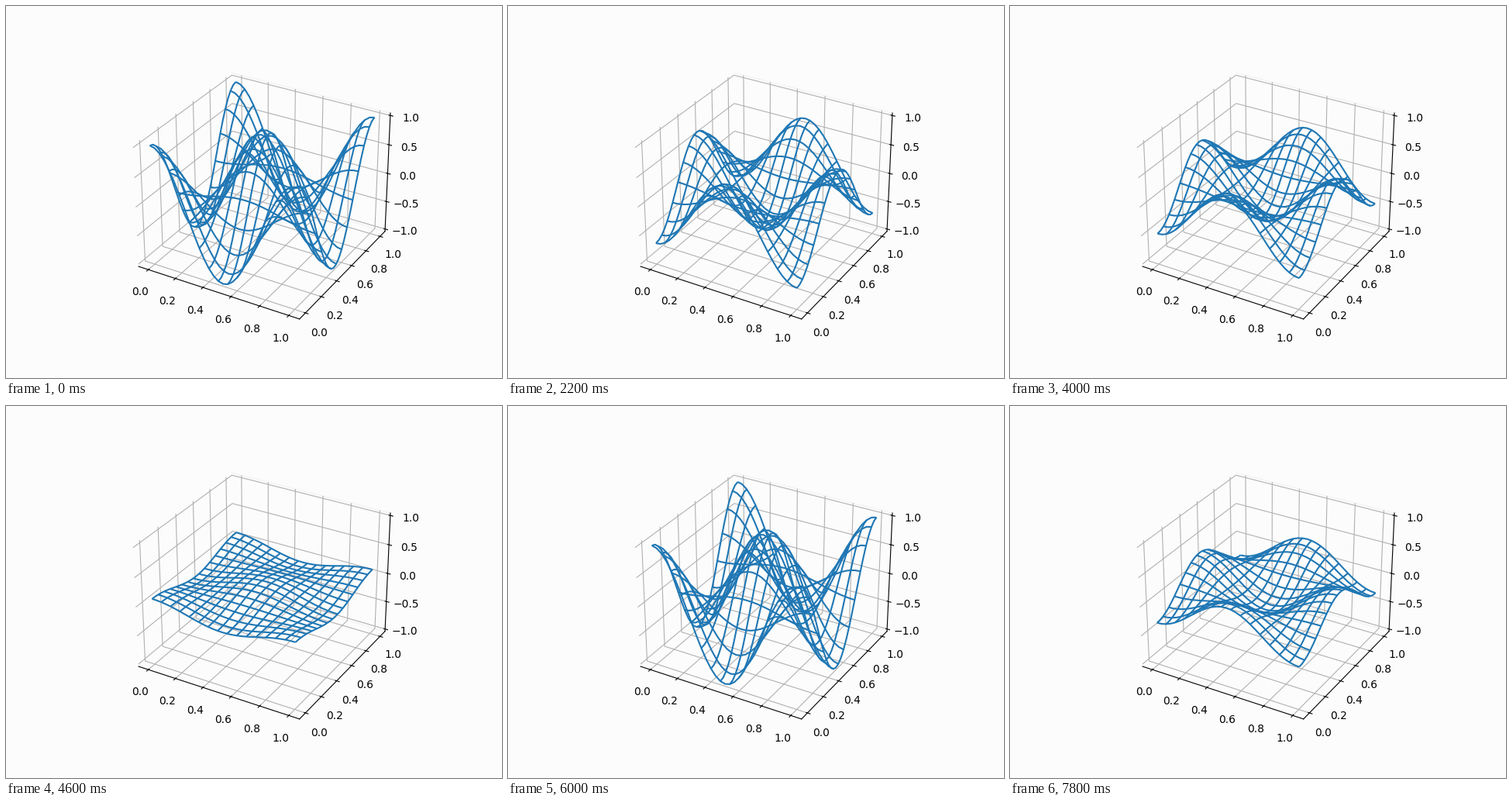
Write a matplotlib script that moves like this. It is 640x480 px and loops after 8 s.

```python
import numpy as np
import matplotlib.pyplot as plt
from matplotlib.animation import FuncAnimation

FRAMES = 40
PERIOD = 30          # frames per oscillation
MARGIN = 1 / 48

x, y = np.meshgrid(np.linspace(0, 1, 31), np.linspace(0, 1, 31), indexing="ij")
mode = np.cos(2 * np.pi * x) * np.cos(2 * np.pi * y)

fig = plt.figure(figsize=(6.4, 4.8), dpi=100, facecolor="#fcfcfc")
ax = fig.add_subplot(projection="3d", facecolor="none")
ax.set_xlim(-0.05, 1.05, view_margin=MARGIN)
ax.set_ylim(-0.05, 1.05, view_margin=MARGIN)
ax.set_zlim(-1, 1, view_margin=MARGIN)
ax.set_xticks(np.linspace(0, 1, 6))
ax.set_yticks(np.linspace(0, 1, 6))
ax.set_zticks(np.linspace(-1, 1, 5))

for axis, edge in ((ax.xaxis, "none"), (ax.yaxis, "#ececec"), (ax.zaxis, "none")):
    axis.pane.set_facecolor("none")
    axis.pane.set_edgecolor(edge)

wire = None


def draw(i):
    global wire
    if wire is not None:
        wire.remove()
    z = mode * np.cos(2 * np.pi * i / PERIOD)
    wire = ax.plot_wireframe(x, y, z, rstride=2, cstride=2, color="C0")
    return [wire]


anim = FuncAnimation(fig, draw, frames=FRAMES, interval=200,
                     repeat=True, repeat_delay=0, blit=False)
plt.show()
```
